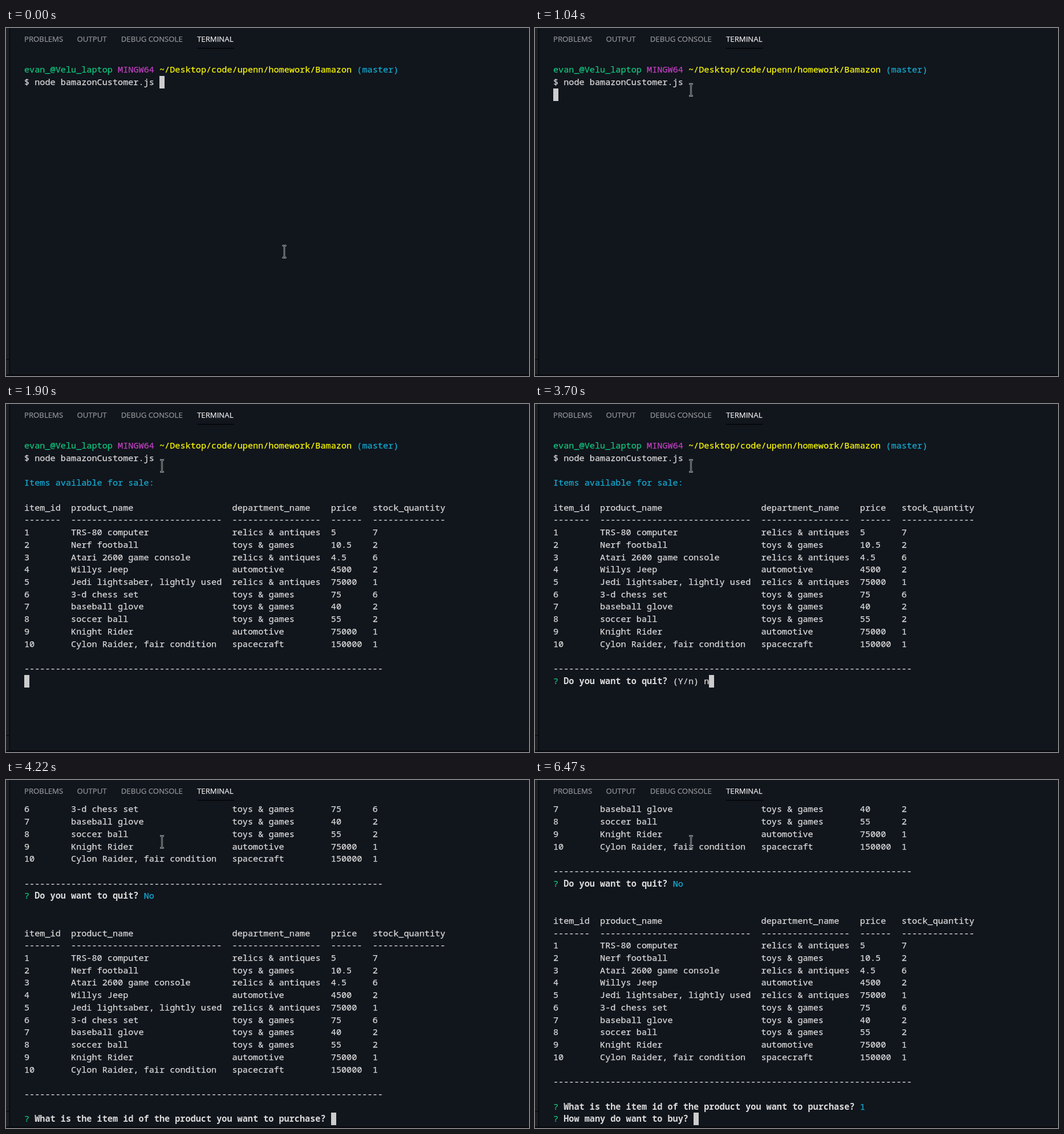
An HTML page for the animation above (8000 ms loop, 917 by 610 pixels).

```html
<!DOCTYPE html>
<html lang="en">
<head>
<meta charset="utf-8">
<title>Terminal session</title>
<style>
  html, body { margin: 0; width: 100%; height: 100%; overflow: hidden; background: #11151c; }
  svg { display: block; width: 917px; height: 610px; }
  text { white-space: pre; fill: currentColor; stroke: currentColor; stroke-width: .25px; }
  .tab { font: 13.2px "Open Sans", "Noto Sans", sans-serif; color: #929497; }
  .active { color: #ebebeb; }
  #rows { font: 15.19px "Noto Sans Mono", "DejaVu Sans Mono", monospace; }
  .bold { font-weight: 700; stroke: none; }
</style>
</head>
<body>
<svg viewBox="0 0 917 610">
  <rect width="917" height="610" fill="#11151c"/>
  <rect width="6" height="610" fill="#1b1e23"/>
  <rect x="5.5" width="1.5" height="610" fill="#07090c"/>
  <rect y="580.5" width="6" height="1.5" fill="#07090c"/>
  <rect y="607.5" width="917" height="2.5" fill="#080a0e"/>
  <text class="tab" x="32" y="24.4">PROBLEMS</text>
  <text class="tab" x="124.6" y="24.4">OUTPUT</text>
  <text class="tab" x="201.7" y="24.4">DEBUG CONSOLE</text>
  <text class="tab active" x="335" y="24.4">TERMINAL</text>
  <rect x="335" y="35" width="65" height="1.3" fill="#020305"/>
  <g id="rows"></g>
  <rect id="block" width="9" height="22" fill="#cccccc"/>
  <g id="pointer" fill="none">
    <path d="M-3.5 -10.5H-1L0 -9.5L1 -10.5H3.5M0 -10V10M-3.5 10.5H-1L0 9.5L1 10.5H3.5" stroke="#c4c6c9" stroke-width="2.6"/>
    <path d="M-3 -10.5H-1L0 -9.5L1 -10.5H3M0 -10V10M-3 10.5H-1L0 9.5L1 10.5H3" stroke="#0b0d11"/>
  </g>
</svg>
<script>
const LOOP = 8000, LEFT = 32, TOP = 40.4, CHAR = 9.115, LINE = 21.72;
const TEXT = "#dadada", GREEN = "#12c47c", MAGENTA = "#c040c0", YELLOW = "#f8f808", CYAN = "#14abd2";
const $ = id => document.getElementById(id);

// A line is a list of [column, text, colour, bold].
const say = (text, color = TEXT, col = 0) => [[col, text, color]];
const ask = (question, answer = "", color = CYAN) => [
  [0, "?", GREEN],
  [2, question, TEXT, true],
  [question.length + 3, answer, color]
];

const columns = [0, 9, 40, 59, 67];
const tableRow = cells => cells.map((cell, i) => [columns[i], String(cell), TEXT]);
const headings = ["item_id", "product_name", "department_name", "price", "stock_quantity"];
const relics = "relics & antiques", toys = "toys & games", cars = "automotive";
const stock = [
  ["TRS-80 computer", relics, 5, 7],
  ["Nerf football", toys, 10.5, 2],
  ["Atari 2600 game console", relics, 4.5, 6],
  ["Willys Jeep", cars, 4500, 2],
  ["Jedi lightsaber, lightly used", relics, 75000, 1],
  ["3-d chess set", toys, 75, 6],
  ["baseball glove", toys, 40, 2],
  ["soccer ball", toys, 55, 2],
  ["Knight Rider", cars, 75000, 1],
  ["Cylon Raider, fair condition", "spacecraft", 150000, 1]
];
const table = [
  tableRow(headings),
  tableRow([7, 29, 17, 6, 14].map(n => "-".repeat(n))),
  ...stock.map((item, i) => tableRow([i + 1, ...item])),
  [],
  say("-".repeat(69))
];

const prompt = [
  [],
  [[0, "evan_@Velu_laptop", GREEN], [18, "MINGW64", MAGENTA],
   [26, "~/Desktop/code/upenn/homework/Bamazon", YELLOW], [64, "(master)", CYAN]],
  say("$ node bamazonCustomer.js")
];
const listing = [...prompt, [], say("Items available for sale:", CYAN), [], ...table];
const quit = "Do you want to quit?";
const which = "What is the item id of the product you want to purchase?";
const relisted = [...listing, ask(quit, "No"), [], [], ...table, []];

// Each screen: start time, lines, first visible line, cursor column and row.
const screens = [
  [0, prompt, 0, 26, 2],
  [1040, prompt, 0, 0, 3],
  [1900, listing, 0, 0, 20],
  [1970, [...listing, ask(quit, "(Y/n)", TEXT)], 0, 29, 20],
  [3700, [...listing, ask(quit, "(Y/n) n", TEXT)], 0, 30, 20],
  [4220, [...relisted, ask(which)], 13, 59, 25],
  [5640, [...relisted, ask(which, "1", TEXT)], 13, 60, 25],
  [6470, [...relisted, ask(which, "1"), ask("How many do want to buy?")], 14, 27, 25]
];

// Rows sit on whole pixels.
const rowTop = row => Math.round(TOP + row * LINE);
const escapeText = s => s.replace(/&/g, "&amp;");
function drawLine(line, row) {
  return line.filter(part => part[1]).map(([col, text, color, bold]) =>
    `<text x="${(LEFT + col * CHAR).toFixed(2)}" y="${rowTop(row) + 16}" color="${color}"` +
    `${bold ? ' class="bold"' : ""}>${escapeText(text)}</text>`).join("");
}

let shown = null;
function showScreen(screen) {
  if (screen === shown) return;
  shown = screen;
  const [, lines, first, col, row] = screen;
  $("rows").innerHTML = lines.slice(first).map(drawLine).join("");
  $("block").setAttribute("x", Math.round(LEFT + col * CHAR));
  $("block").setAttribute("y", rowTop(row));
}

const settle = [[265, 114], [281, 112], [277, 107.5], [273.5, 108.5]];
function pointerAt(t) {
  if (t < 40) return [488, 392];
  if (t >= 570) return settle[Math.min(3, Math.floor((t - 570) / 90))];
  const p = Math.min(5, Math.floor((t - 40) / 75) + 1) / 5;
  const e = p * p * (3 - 2 * p);
  return [488 - 218 * e, 392 - 276 * e];
}

function render(t) {
  showScreen(screens.filter(s => s[0] <= t).pop());
  $("pointer").setAttribute("transform", `translate(${pointerAt(t)})`);
}

const start = performance.now();
function tick() {
  render((performance.now() - start) % LOOP);
  requestAnimationFrame(tick);
}
tick();
</script>
</body>
</html>
```
